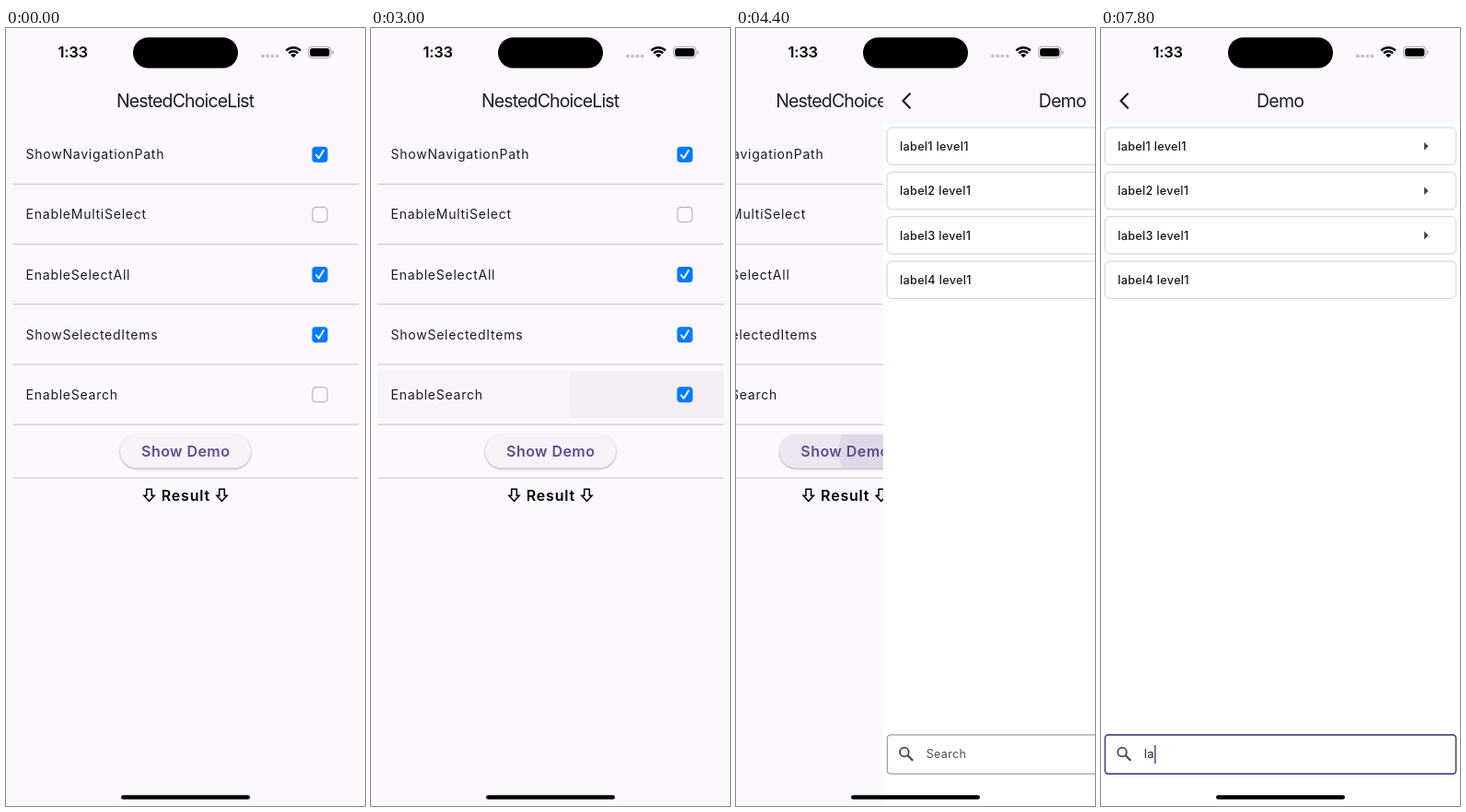
These frames come from a looping animation (390 px wide and 844 px high, 8000 ms). An HTML page with a canvas:

```html
<!DOCTYPE html>
<html lang="en">
<head>
<meta charset="utf-8">
<title>NestedChoiceList</title>
<style>
  html, body { margin: 0; width: 100%; height: 100%; overflow: hidden; background: #fdf7ff; }
  canvas { display: block; width: 390px; height: 844px; }
</style>
</head>
<body>
<canvas id="stage"></canvas>
<script>
const W = 390, H = 844, LOOP = 8000, STEP = 100;
const BG = '#fdf7ff', INK = '#1d1b20', PURPLE = '#5f4e8e';
const OPTIONS = ['ShowNavigationPath', 'EnableMultiSelect', 'EnableSelectAll', 'ShowSelectedItems', 'EnableSearch'];

const canvas = document.getElementById('stage');
const ctx = canvas.getContext('2d');
const dpr = window.devicePixelRatio || 1;
canvas.width = W * dpr;
canvas.height = H * dpr;

const clamp = v => Math.max(0, Math.min(1, v));
const ramp = (t, from, to) => clamp((t - from) / (to - from));

function text(str, x, y, size, { weight = 400, color = INK, gap = 0, align = 'left' } = {}) {
  ctx.font = `${weight} ${size}px Inter, "Liberation Sans", sans-serif`;
  ctx.letterSpacing = gap + 'px';
  ctx.textAlign = 'left';
  ctx.fillStyle = color;
  const width = ctx.measureText(str).width;
  ctx.fillText(str, align === 'center' ? x - (width - gap) / 2 : x, y);
  return width;
}

function rounded(x, y, w, h, r) {
  ctx.beginPath();
  ctx.roundRect(x, y, w, h, r);
}

function fillBox(x, y, w, h, r, color) {
  rounded(x, y, w, h, r);
  ctx.fillStyle = color;
  ctx.fill();
}

function strokeBox(x, y, w, h, r, color, line = 1) {
  rounded(x, y, w, h, r);
  ctx.strokeStyle = color;
  ctx.lineWidth = line;
  ctx.stroke();
}

function disc(x, y, r, color) {
  ctx.beginPath();
  ctx.arc(x, y, r, 0, Math.PI * 2);
  ctx.fillStyle = color;
  ctx.fill();
}

function trace(points, close) {
  ctx.beginPath();
  points.forEach(([x, y]) => ctx.lineTo(x, y));
  if (close) ctx.closePath();
}

function polyline(points, color, line, close) {
  trace(points, close);
  ctx.strokeStyle = color;
  ctx.lineWidth = line;
  ctx.stroke();
}

function checkbox(y, on) {
  if (!on) return strokeBox(333, y - 7.8, 16, 16, 3.5, '#aaa5ad');
  fillBox(332.5, y - 8.3, 17, 17, 4, '#007aff');
  ctx.lineCap = ctx.lineJoin = 'round';
  polyline([[337, y + 0.8], [339.8, y + 4.2], [345, y - 4.2]], '#fff', 1.9);
}

function downArrow(x) {
  ctx.lineJoin = 'miter';
  polyline([[x - 2.8, 500.3], [x + 2.8, 500.3], [x + 2.8, 507.3], [x + 5.6, 507.3],
    [x, 513.3], [x - 5.6, 507.3], [x - 2.8, 507.3]], '#000', 1.5, true);
}

function rowRipple(t) {
  if (t < 2900 || t >= 3200) return;
  const fade = 1 - ramp(t, 2900, 3200);
  ctx.save();
  ctx.beginPath();
  ctx.rect(7.5, 372, 375.5, 51);
  ctx.clip();
  ctx.fillStyle = `rgba(70,30,50,${0.022 * fade})`;
  ctx.fillRect(7, 372, 377, 51);
  disc(341, 397.5, 56 + (t - 2900) * 0.7, `rgba(40,40,30,${0.042 * fade})`);
  ctx.restore();
}

function demoButton(t) {
  ctx.save();
  ctx.shadowColor = 'rgba(0,0,0,0.32)';
  ctx.shadowBlur = 2.5 * dpr;
  ctx.shadowOffsetY = dpr;
  fillBox(124, 441, 142, 36.5, 18.25, '#f7f2fa');
  ctx.restore();
  if (t >= 4100 && t < 4600) {
    ctx.save();
    rounded(124, 441, 142, 36.5, 18.25);
    ctx.clip();
    ctx.fillStyle = `rgba(101,85,143,${0.07 * ramp(t, 4000, 4200)})`;
    ctx.fillRect(124, 441, 142, 37);
    disc(227, 459, 9 + (t - 4100) * 0.1, 'rgba(101,85,143,0.1)');
    ctx.restore();
  }
  text('Show Demo', 195, 464.7, 16, { weight: 600, color: PURPLE, gap: 0.45, align: 'center' });
}

function optionsPage(t) {
  ctx.fillStyle = BG;
  ctx.fillRect(0, 0, W, H);
  text('NestedChoiceList', 195, 86, 19.5, { gap: -0.85, align: 'center' });
  rowRipple(t);
  const checked = [true, false, true, true, t >= 3000];
  OPTIONS.forEach((label, i) => {
    const y = 137 + i * 65.15;
    text(label, 21.6, y + 5.2, 14, { gap: 0.75 });
    checkbox(y, checked[i]);
  });
  ctx.fillStyle = '#cdc7d2';
  for (let i = 0; i < 5; i++) ctx.fillRect(7.5, 168.8 + i * 65.2, 375.5, 1.1);
  ctx.fillRect(7.5, 487.7, 375.5, 1.1);
  demoButton(t);
  downArrow(155.5);
  downArrow(234.5);
  text('Result', 195, 512.5, 16, { weight: 600, color: '#000', gap: 0.8, align: 'center' });
}

function cursorAlpha(t) {
  if (t < 5800) return 0;
  if (t < 6300) return 1;
  if (t < 6400) return 0.65;
  if (t < 6600) return 0;
  if (t < 6800) return t < 6700 ? 0.3 : 0.7;
  if (t < 7300) return 1;
  if (t < 7500) return t < 7400 ? 0.65 : 0;
  return 1;
}

function searchField(t) {
  const focus = ramp(t, 5700, 5900);
  strokeBox(4.4, 766.9, 381.2, 42.2, 3.5, focus ? '#514a82' : '#88848b', 1 + 0.7 * focus);
  ctx.beginPath();
  ctx.arc(23, 785.5, 4.8, 0, Math.PI * 2);
  ctx.strokeStyle = '#49454f';
  ctx.lineWidth = 1.8;
  ctx.stroke();
  ctx.lineCap = 'butt';
  polyline([[26.3, 788.8], [32.3, 794.8]], '#49454f', 2.2);

  const typed = t < 7500 ? '' : t < 7700 ? 'l' : 'la';
  let x = 47.7;
  if (typed) x += text(typed, 46.8, 792.3, 12.8, { gap: 0.3 });
  else text('Search', 46.8, 792.2, 12.5, { color: '#504c55', gap: 0.35 });
  ctx.globalAlpha = cursorAlpha(t);
  ctx.fillStyle = PURPLE;
  ctx.fillRect(x - 0.6, 778, 1.6, 20);
  ctx.globalAlpha = 1;
}

function demoPage(t) {
  ctx.fillStyle = '#fff';
  ctx.fillRect(0, 0, W, H);
  ctx.fillStyle = BG;
  ctx.fillRect(0, 0, W, 104);
  ctx.lineCap = 'butt';
  ctx.lineJoin = 'miter';
  polyline([[29.6, 70.8], [21.6, 79], [29.6, 87.2]], INK, 2.2);
  text('Demo', 195, 86, 19.5, { gap: -0.7, align: 'center' });
  for (let i = 0; i < 4; i++) {
    const y = 128.3 + i * 48.35;
    strokeBox(4.2, y - 20.3, 381.6, 40.4, 5.5, '#d2cfd3');
    text(`label${i + 1} level1`, 18.2, y + 4.5, 12.6, { weight: 500, color: '#17161a', gap: 0.33 });
    if (i === 3) continue;
    trace([[351.2, y - 4.4], [355.6, y], [351.2, y + 4.4]], true);
    ctx.fillStyle = '#3f3c42';
    ctx.fill();
  }
  searchField(t);
}

function wifi(x, y) {
  const a = Math.PI * 0.25;
  ctx.lineCap = 'butt';
  ctx.strokeStyle = '#000';
  ctx.lineWidth = 2.4;
  for (const r of [7, 11]) {
    ctx.beginPath();
    ctx.arc(x, y, r, -Math.PI + a, -a);
    ctx.stroke();
  }
  ctx.beginPath();
  ctx.moveTo(x, y);
  ctx.arc(x, y, 4.2, -Math.PI + a, -a);
  ctx.fillStyle = '#000';
  ctx.fill();
}

function systemBars() {
  text('1:33', 56.4, 32.4, 16.5, { weight: 600, color: '#000', gap: -0.2 });
  fillBox(138, 10.2, 114, 33.4, 16.7, '#000');
  for (let i = 0; i < 4; i++) disc(279 + i * 5.2, 30.4, 1.9, '#c8c3ca');
  wifi(312.2, 32.3);
  strokeBox(328.5, 20.3, 24.6, 12.2, 4, '#a7a3a9');
  fillBox(330.2, 22, 21.2, 8.8, 2.5, '#000');
  fillBox(354.4, 24.3, 1.4, 4.2, [0, 1.4, 1.4, 0], '#aaa6ac');
  fillBox(125, 832.2, 140, 4.6, 2.3, '#000');
}

function draw(t) {
  ctx.setTransform(dpr, 0, 0, dpr, 0, 0);
  const slide = 1 - Math.pow(1 - ramp(t, 4300, 4600), 2.2);
  if (slide < 1) {
    ctx.save();
    ctx.translate(-W / 3 * slide, 0);
    optionsPage(t);
    ctx.restore();
  }
  if (slide > 0) {
    ctx.save();
    ctx.translate(W * (1 - slide), 0);
    demoPage(t);
    ctx.restore();
  }
  systemBars();
}

const start = performance.now();
function tick() {
  const t = (performance.now() - start) % LOOP;
  draw(Math.floor(t / STEP) * STEP);
  requestAnimationFrame(tick);
}
tick();
</script>
</body>
</html>
```
